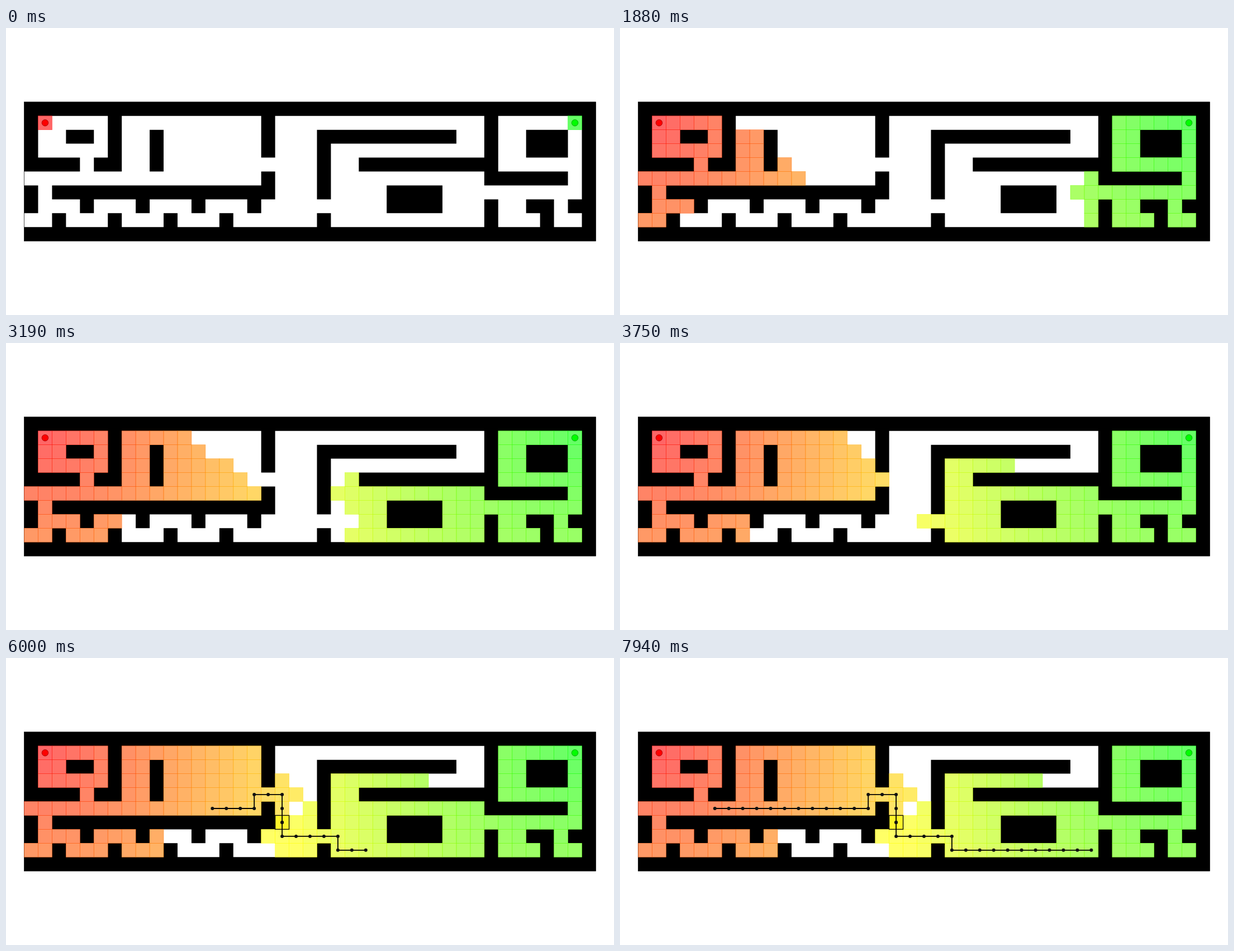
Recreate the animation shown at these times as an HTML page with a canvas. Size 1088 by 515 pixels, loop 8000 ms.

```html
<!DOCTYPE html>
<html lang="en">
<head>
<meta charset="utf-8">
<title>Bidirectional search</title>
<style>
  html, body { margin: 0; width: 100%; height: 100%; overflow: hidden; background: #fff; }
  canvas { display: block; }
</style>
</head>
<body>
<canvas id="stage" width="1088" height="515"></canvas>
<script>
const ctx = document.getElementById('stage').getContext('2d');
const COLS = 41, ROWS = 10, CELL = 24.95;
const LEFT = 544 - COLS * CELL / 2, TOP = 257.5 - ROWS * CELL / 2;
const LOOP = 8000, TICK = 62.5, SEARCH_STEP = 46, PATH_STEP = 218, PATH_START = 4250;

// Wall columns of each row, as single cells or ranges
const WALL_RUNS = [
  '0-40',
  '0 6 17 33 40',
  '0 3-4 6 9 17 21-30 33 36-38 40',
  '0 6 9 17 21 33 36-38 40',
  '0-3 5-6 9 21 24-33 40',
  '17 21 33-38 40',
  '0 2-17 21 26-29 40',
  '0 4 8 12 16 26-29 33 36-37 39-40',
  '2 6 10 14 21 33 37 40',
  '0-40',
];
const left = x => LEFT + x * CELL;
const top_ = y => TOP + y * CELL;
const center = ({ x, y }) => [left(x + .5), top_(y + .5)];

const blocked = new Set();
const walls = new Path2D();
WALL_RUNS.forEach((row, y) => {
  for (const run of row.split(' ')) {
    const [from, to = from] = run.split('-').map(Number);
    walls.rect(left(from), top_(y), (to - from + 1) * CELL, CELL);
    for (let x = from; x <= to; x++) blocked.add(x + ',' + y);
  }
});

// Breadth-first visiting order: down, left, right, up
function search(x, y) {
  const order = [{ x, y }];
  const seen = new Set([x + ',' + y]);
  for (let i = 0; i < order.length; i++) {
    const cell = order[i];
    for (const [dx, dy] of [[0, 1], [-1, 0], [1, 0], [0, -1]]) {
      const next = { x: cell.x + dx, y: cell.y + dy, parent: cell };
      const key = next.x + ',' + next.y;
      if (next.x < 0 || blocked.has(key) || seen.has(key)) continue;
      seen.add(key);
      order.push(next);
    }
  }
  return order;
}

function trace(cell) {
  const path = [];
  for (; cell; cell = cell.parent) path.push(cell);
  return path;
}

function makeSide(x, y, hue, turn, dotColor, edgeColor) {
  const all = search(x, y);
  const meet = all.findIndex(c => c.x === 18 && c.y === 6);
  const cells = all.slice(0, meet + 1);
  for (const c of cells) {
    const far = Math.min(1, Math.hypot(c.x - x, c.y - y) / 21);
    c.color = `hsl(${hue + turn * far}, 100%, 50%)`;
  }
  return { cells, path: trace(all[meet]), dotColor, edgeColor };
}
const sides = [
  makeSide(1, 1, 0, 60, '#f00', '#900'),
  makeSide(39, 1, 120, -60, '#0f0', '#090'),
];
const lastStep = Math.max(...sides.map(s => s.cells.length)) - 1;

function dot(cell, radius) {
  ctx.beginPath();
  ctx.arc(...center(cell), radius, 0, 7);
  ctx.fill();
}

function drawCells(cells) {
  ctx.globalAlpha = .6;
  ctx.lineWidth = .7;
  for (const c of cells) {
    ctx.fillStyle = ctx.strokeStyle = c.color;
    ctx.fillRect(left(c.x), top_(c.y), CELL, CELL);
    ctx.strokeRect(left(c.x), top_(c.y), CELL, CELL);
  }
  ctx.globalAlpha = 1;
}

function drawPath(path) {
  ctx.lineWidth = 1.8;
  ctx.strokeStyle = '#000';
  ctx.fillStyle = '#111';
  ctx.beginPath();
  path.forEach(c => ctx.lineTo(...center(c)));
  ctx.stroke();
  path.forEach(c => dot(c, 3));
}

function draw(t) {
  ctx.fillStyle = '#fff';
  ctx.fillRect(0, 0, 1088, 515);
  ctx.fillStyle = ctx.strokeStyle = '#000';
  ctx.fill(walls);
  ctx.lineWidth = .7;
  ctx.strokeRect(LEFT, TOP, COLS * CELL, ROWS * CELL);

  // The search pauses briefly after its first 18 steps
  const step = Math.floor(Math.max(Math.min(t / 45, 18), (t - 125) / SEARCH_STEP));
  for (const side of sides) {
    drawCells(side.cells.slice(0, step + 1));
    ctx.fillStyle = side.dotColor;
    ctx.strokeStyle = side.edgeColor;
    ctx.lineWidth = .8;
    dot(side.cells[0], 5.8);
    ctx.stroke();
  }
  if (step < lastStep) return;

  const meet = sides[0].path[0];
  ctx.strokeStyle = '#000';
  ctx.lineWidth = 1.3;
  ctx.strokeRect(left(meet.x), top_(meet.y), CELL, CELL);
  const reach = Math.floor((t - PATH_START) / PATH_STEP);
  for (const side of sides) drawPath(side.path.slice(0, reach + 1));
}

function frame() {
  const t = performance.now() % LOOP;
  draw(Math.min(127, Math.floor((t + 4) / TICK)) * TICK);
  requestAnimationFrame(frame);
}
frame();
</script>
</body>
</html>
```
